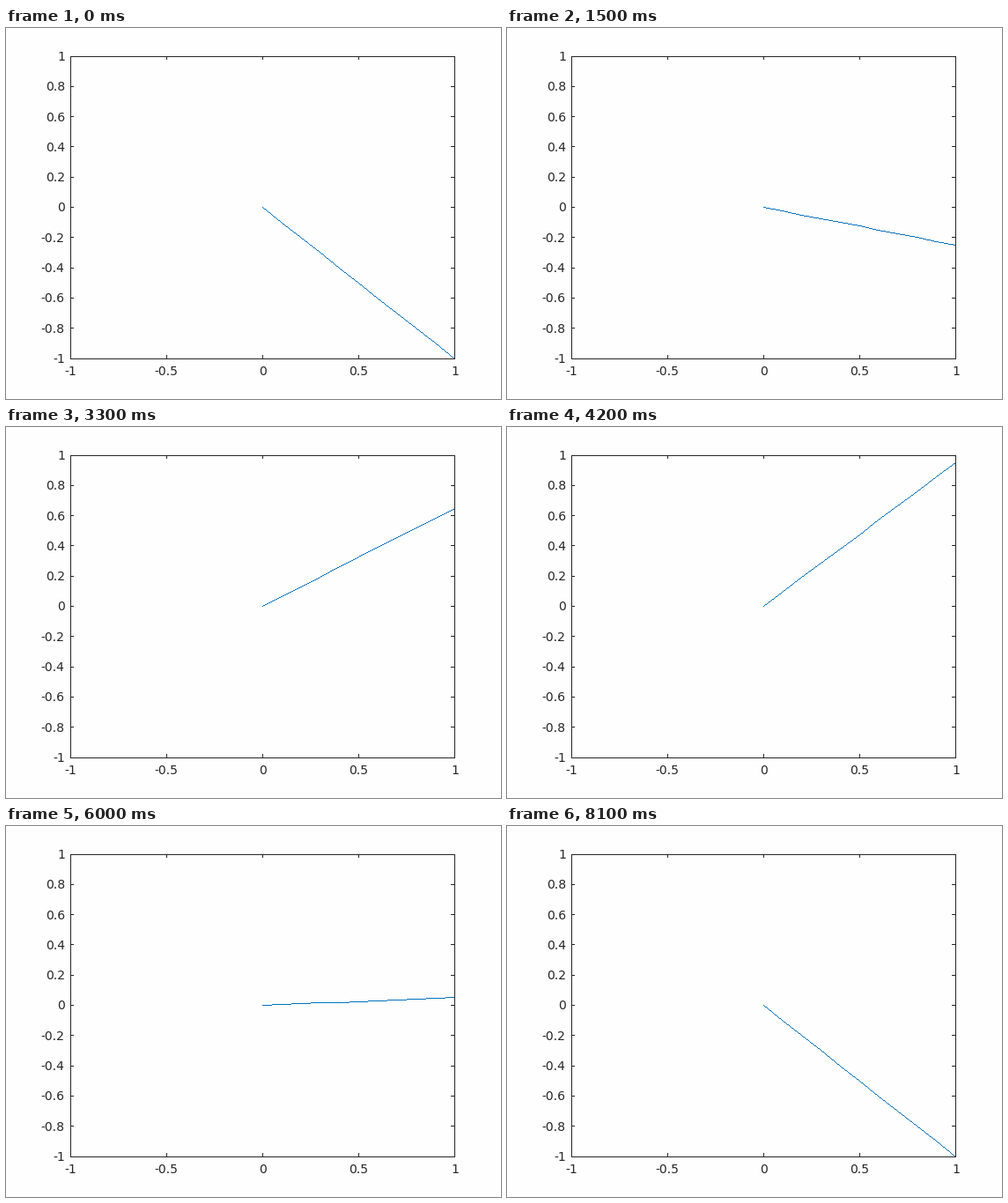
These frames come from a looping animation (562 px wide and 421 px high, 8200 ms). A matplotlib script:

```python
import math

import numpy as np
import matplotlib.pyplot as plt
from matplotlib.animation import FuncAnimation
from matplotlib.patches import Rectangle

W, H, DPI = 562, 421, 100
LEFT, RIGHT, TOP, BOTTOM = 73, 509, 32, 375
CX, CY = (LEFT + RIGHT) / 2, (TOP + BOTTOM) / 2
HALF_W, HALF_H = (RIGHT - LEFT) / 2, (BOTTOM - TOP) / 2
INK, BLUE, PAPER = "#262626", "#0072bd", "#fefefe"
TICK = 4
FONT = 14
STEPS = 41

plt.rcParams["font.family"] = "DejaVu Sans"
fig = plt.figure(figsize=(W / DPI, H / DPI), dpi=DPI, facecolor=PAPER)
ax = fig.add_axes([0, 0, 1, 1])
ax.axis("off")


def bar(x, y, w, h):
    ax.add_patch(Rectangle((x, y), w, h, fc=INK, lw=0, antialiased=False,
                           snap=False, zorder=3))


def advance(text):
    """Pen advance of a number in pixels, side bearings included."""
    em = {"-": 0.361, ".": 0.318}
    return FONT * sum(em.get(c, 0.636) for c in text)


def label(x, y, value, align):
    """Place a number by its advance: align 0.5 centres, 1 ends at x."""
    text = f"{value:g}"
    ax.text(x - align * advance(text), y, text, color=INK,
            fontsize=FONT * 72 / DPI, ha="left", va="baseline")


# Box outline
for y in (TOP, BOTTOM):
    bar(LEFT, y, RIGHT - LEFT + 1, 1)
for x in (LEFT, RIGHT):
    bar(x, TOP, 1, BOTTOM - TOP + 1)

# Ticks and labels
for i in range(-2, 3):
    x = math.floor(CX + HALF_W * i / 2)
    bar(x, TOP, 1, TICK)
    bar(x, BOTTOM - TICK, 1, TICK)
    label(x + 0.5, 394, i / 2, 0.5)
for i in range(-5, 6):
    y = CY - HALF_H * i / 5
    bar(LEFT, math.floor(y), TICK, 1)
    bar(RIGHT - TICK, math.floor(y), TICK, 1)
    label(67, y + 4.95, i / 5, 1)

# One-pixel stepped line through sample points on whole pixels
samples = np.linspace(0, 1, 11)
knots = np.floor(CX + HALF_W * samples)
edges = np.arange(int(CX), RIGHT + 1)
cols = edges[:-1]
line = ax.stairs(np.zeros(len(cols)), edges, baseline=np.ones(len(cols)),
                 fill=True, fc=BLUE, lw=0, antialiased=False, snap=False)
ax.set_xlim(0, W)
ax.set_ylim(H, 0)


def draw(k):
    step = k if k < STEPS else 2 * STEPS - 1 - k
    end = -1 + 0.05 * step
    heights = np.floor(CY - HALF_H * end * samples)
    rows = np.floor(np.interp(cols, knots, heights) + 0.5)
    line.set_data(rows, edges, rows + 1)
    return [line]


anim = FuncAnimation(fig, draw, frames=2 * STEPS, interval=100,
                     repeat=True, repeat_delay=0)
plt.show()
```
